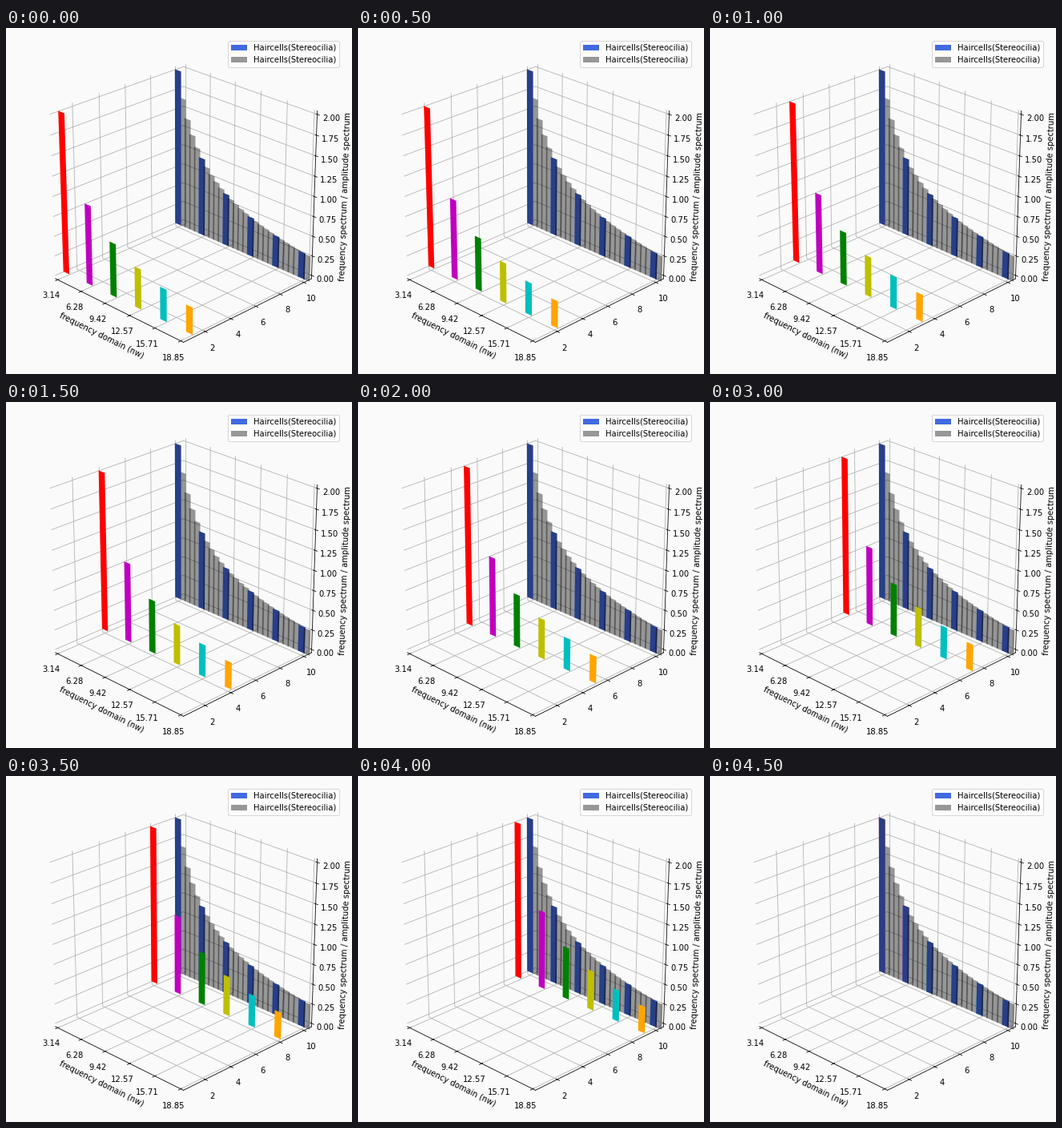
A matplotlib script for the animation above (5000 ms loop, 432 by 432 pixels).

```python
import numpy as np
import matplotlib.pyplot as plt
from matplotlib.animation import FuncAnimation

BG = "#fafafa"
COLORS = ["r", "m", "g", "y", "c", "orange"]
STEPS = 10

plt.rcParams.update({"font.family": "DejaVu Sans", "font.size": 10})


def padded(lo, hi):
    """Limits widened by the small margin around the box."""
    pad = (hi - lo) / 48
    return lo - pad, hi + pad


fig = plt.figure(figsize=(6, 6), dpi=72, facecolor=BG)
ax = fig.add_axes([0.025, 0.025, 0.95, 0.95], projection="3d", facecolor=BG)
ax.set_box_aspect((1, 1, 1), zoom=np.sqrt(3) / 1.8294640721620434)
ax.view_init(elev=25, azim=-45)

# Amplitude falls off as 2*pi / w; every fifth sample is a harmonic.
freq = np.pi * (1 + np.arange(27) / 5)
amp = 2 * np.pi / freq
harm, harm_amp = freq[::5], amp[::5]

slices = [ax.bar(harm, harm_amp, zs=y, zdir="y", color=COLORS)
          for y in range(1, STEPS + 1)]
ax.bar(harm, harm_amp, zs=STEPS, zdir="y", color="royalblue",
       label="Haircells(Stereocilia)")
ax.bar(freq, amp, zs=STEPS, zdir="y", color="k", alpha=0.4,
       label="Haircells(Stereocilia)")

ax.set_xlim(*padded(np.pi, 6 * np.pi))
ax.set_ylim(*padded(0.55, 10.45))
ax.set_zlim(*padded(0, 2))
ax.set_xticks(harm, [f"{x:.2f}" for x in harm])
ax.set_yticks(range(2, 11, 2))
ax.set_zticks(np.arange(9) / 4)
ax.set_xlabel("frequency domain (nw)")
ax.set_zlabel("frequency spectrum / amplitude spectrum")
for axis in (ax.xaxis, ax.yaxis, ax.zaxis):
    axis.set_pane_color((1, 1, 1, 0))
ax.legend(loc="upper right")


def update(i):
    for k, bars in enumerate(slices):
        for bar in bars:
            bar.set_visible(k == i)
    return []


anim = FuncAnimation(fig, update, frames=STEPS, interval=500,
                     init_func=lambda: update(0), repeat=True, repeat_delay=0)
plt.show()
```
